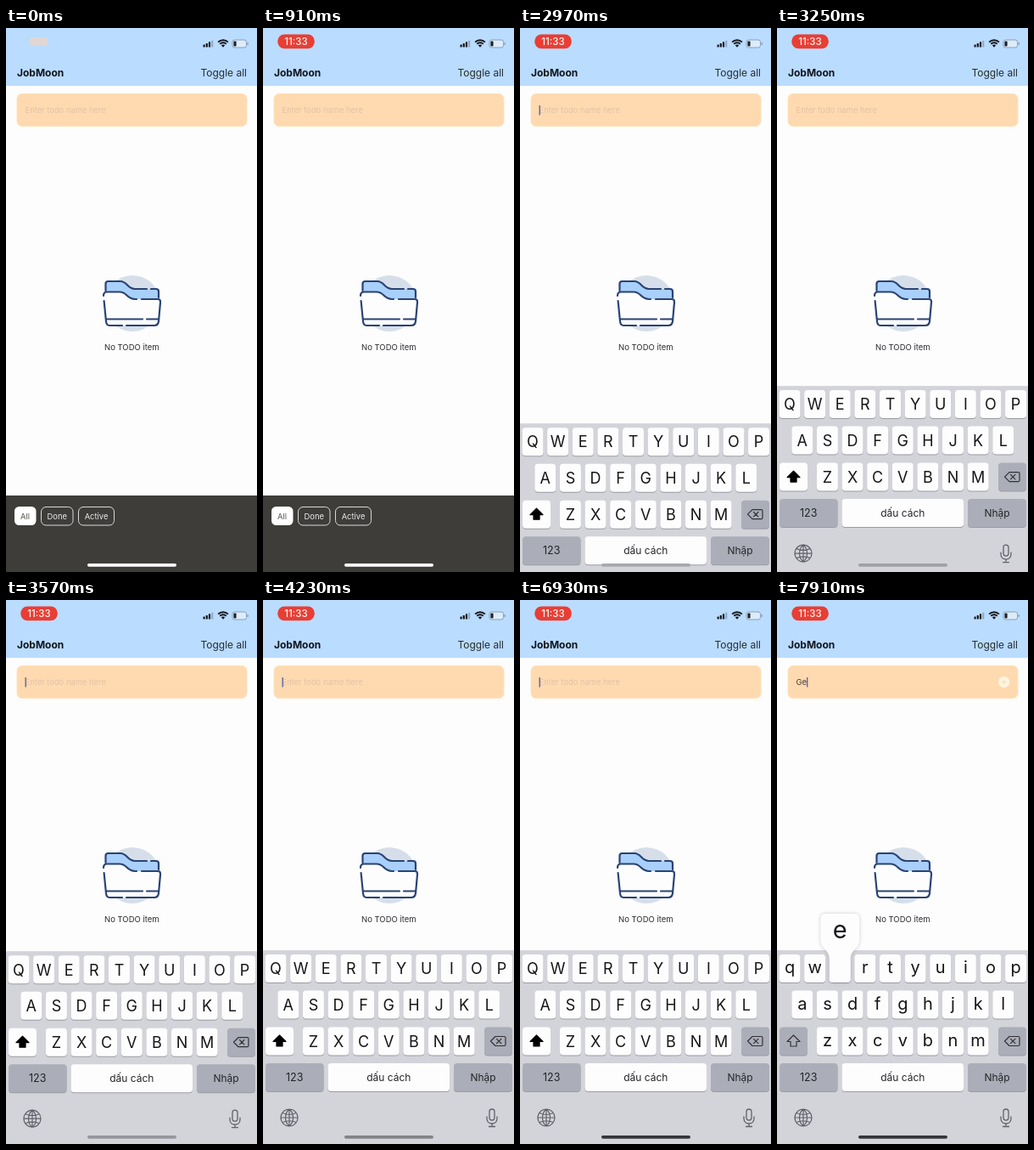
Write an HTML page with a canvas that moves like this. It is 296 px wide and 640 px high and loops after 8000 ms.

```html
<!DOCTYPE html>
<html lang="en">
<head>
<meta charset="utf-8">
<title>Task list</title>
<style>
html, body { margin: 0; width: 100%; height: 100%; overflow: hidden; background: #fdfdfe; }
canvas { display: block; width: 296px; height: 640px; }
</style>
</head>
<body>
<canvas id="stage"></canvas>
<script>
const W = 296, H = 640, LOOP = 8000;
const FOCUS = 2740, KB_TOP = 412;
const KEY_W = 25, KEY_H = 33, PITCH = 29.62;
const INK = '#161619', LINE = '#2a4374', FONT = 'Inter, "Open Sans", sans-serif';
const ROWS = ['QWERTYUIOP', 'ASDFGHJKL', 'ZXCVBNM'];
const ROW_X = [15, 29.8, 59.4];
const ROW_Y = [5, 47.5, 90.5, 133];
const PRESSES = [
  { char: 'G', from: 7300, to: 7430 },
  { char: 'e', from: 7780, to: 8000 }
];

const canvas = document.getElementById('stage');
const ratio = window.devicePixelRatio || 1;
canvas.width = W * ratio;
canvas.height = H * ratio;
const c = canvas.getContext('2d');

const clamp = v => Math.max(0, Math.min(1, v));
const ramp = (t, from, to) => clamp((t - from) / (to - from));
const mix = (a, b, k) => `rgb(${a.map((v, i) => Math.round(v + (b[i] - v) * k))})`;

function rect(x, y, w, h, color) {
  c.fillStyle = color;
  c.fillRect(x, y, w, h);
}

function box(x, y, w, h, r, fill, stroke, width = 1) {
  c.beginPath();
  c.roundRect(x, y, w, h, r);
  if (fill) { c.fillStyle = fill; c.fill(); }
  if (stroke) { c.strokeStyle = stroke; c.lineWidth = width; c.stroke(); }
}

function disc(x, y, r, color) {
  c.beginPath();
  c.arc(x, y, r, 0, Math.PI * 2);
  c.fillStyle = color;
  c.fill();
}

function text(str, x, y, size, color, align = 'left', weight = 400) {
  c.font = `${weight} ${size}px ${FONT}`;
  c.textAlign = align;
  c.fillStyle = color;
  c.fillText(str, x, y);
}

function path(d, stroke, width, fill) {
  const p = new Path2D(d);
  if (fill) { c.fillStyle = fill; c.fill(p); }
  if (stroke) { c.strokeStyle = stroke; c.lineWidth = width; c.stroke(p); }
}

function drawStatus(t) {
  const shown = ramp(t, 60, 450);
  if (shown < 1) {
    c.globalAlpha = 1 - shown;
    box(28, 11, 21, 10, 3, '#e0d6d4');
  }
  c.globalAlpha = shown;
  const glow = Math.exp(-(((t - 5390) / 550) ** 2));
  box(17.3, 7.5, 43.5, 16.8, 8, mix([232, 62, 52], [252, 72, 68], glow));
  text('11:33', 39, 20.1, 11.5, '#fff3f0', 'center', 500);
  c.globalAlpha = 1;

  for (let i = 0; i < 4; i++) {
    const h = 3 + i * 1.6;
    box(232.5 + i * 3.2, 22.5 - h, 2.2, h, 0.6, i < 3 ? INK : '#93aac6');
  }
  c.lineCap = 'butt';
  for (const r of [8.3, 5.3]) {
    c.beginPath();
    c.arc(256, 22.5, r, -Math.PI * 0.75, -Math.PI * 0.25);
    c.strokeStyle = INK;
    c.lineWidth = 1.9;
    c.stroke();
  }
  path('M256 22.8 L253.8 20.3 Q256 18.7 258.2 20.3 Z', null, 0, INK);
  box(267, 14, 16.5, 9, 2.5, '#dcecfc', '#8298b0', 0.9);
  box(268.4, 15.4, 3.2, 6.2, 1, '#1d2229');
  rect(284.5, 17, 1.2, 3, '#8298b0');
}

function cursorOn(t, typed) {
  const phase = (t - FOCUS) % 1000;
  return t >= FOCUS && (typed || phase < 500 || phase > 800);
}

function drawInput(t) {
  const typed = PRESSES.filter(p => t >= p.from + 60).map(p => p.char).join('');
  box(13, 77.5, 271, 38, 6, '#ffdab0', '#ffe0b4');
  if (typed) {
    text(typed, 22.5, 100, 9.4, '#453a30');
    disc(267.7, 96.4, 6.5, '#fff6e2');
    path('M264.7 96.4h6M267.7 93.4v6', '#ffdcb0', 1.2);
  } else {
    text('Enter todo name here', 22.5, 100, 9.4, '#e3c2a4');
  }
  if (cursorOn(t, typed)) {
    c.font = `400 9.4px ${FONT}`;
    rect(22.5 + c.measureText(typed).width, 91, 1.4, 11.5, '#5a66a8');
  }
}

function drawFolder() {
  disc(149, 324, 33, '#d6dfe9');
  c.lineCap = c.lineJoin = 'round';
  path('M117.5 316 V301 Q117.5 298 120.5 298 H135 C143 298 143 307 152 307 H177 Q180 307 180 310 V320 H150 Z', null, 0, '#a9cffb');
  path('M117.5 309 V301 Q117.5 298 120.5 298 H135 C143 298 143 307 152 307 H166 M171 307 H177 Q180 307 180 310 V317', LINE, 2.2);
  path('M115 315 Q115 310.5 119 310.5 H134 C143 310.5 142 319 152 319 H179 Q182.5 319 182 323 L180 345 Q179.3 350 175 350 H122 Q118.5 350 118 345 Z', null, 0, '#fdfdfe');
  path('M115 315 Q115 310.5 119 310.5 H134 C143 310.5 142 319 152 319 H154 M160 319 H179 Q182.5 319 182 323 L180 345 Q179.3 350 175 350 H142 M137 350 H122 Q118.5 350 118 345 L115.6 321 M119 342.5 H161 M166 342.5 H179', LINE, 2.2);
  text('No TODO item', 148.3, 379.4, 9.5, '#2c2c30', 'center');
}

function drawFooter() {
  rect(0, 550, W, 90, '#3f3d3a');
  box(10, 563, 25.5, 22, 5.5, '#ffffff');
  text('All', 22.5, 577.5, 9.4, '#55534f', 'center');
  for (const [label, x, w] of [['Done', 41.5, 37.5], ['Active', 85.5, 42]]) {
    box(x, 563.5, w, 21.5, 5.5, null, '#dad8d8');
    text(label, x + w / 2, 577.5, 9.4, '#eceaea', 'center');
  }
}

function key(x, y, w, fill) {
  box(x, y + 1, w, KEY_H, 4, '#9a9ca3');
  box(x, y, w, KEY_H, 4, fill);
}

function letter(char, x, y) {
  const small = char !== char.toUpperCase();
  text(char, x, y + (small ? 22 : 23.3), small ? 20 : 18, INK, 'center');
}

function popup(char) {
  const row = ROWS.findIndex(r => r.includes(char.toUpperCase()));
  const x = ROW_X[row] + ROWS[row].indexOf(char.toUpperCase()) * PITCH;
  const y = KB_TOP + ROW_Y[row];
  c.save();
  c.translate(x, y);
  c.shadowColor = 'rgba(110,112,125,.35)';
  c.shadowBlur = 4 * ratio;
  path('M-17 -48 H17 Q23 -48 23 -42 V-18 C23 -6 12.5 -6 12.5 5 V29 Q12.5 33 8.5 33 H-8.5 Q-12.5 33 -12.5 29 V5 C-12.5 -6 -23 -6 -23 -18 V-42 Q-23 -48 -17 -48 Z', null, 0, '#fdfdfe');
  c.restore();
  text(char, x, y - 19, 29, INK, 'center');
}

function drawKeyboard(t) {
  if (t < FOCUS) return;
  const offset = (H - KB_TOP) * Math.exp(-6.3 * (t - FOCUS) / 1000);
  const lower = t >= PRESSES[0].to;
  const gray = '#abaeb8', white = '#fdfdfe';

  c.save();
  c.translate(0, KB_TOP + offset);
  rect(0, 0, W, H - KB_TOP, '#d3d4da');
  ROWS.forEach((row, r) => [...row].forEach((char, i) => {
    const x = ROW_X[r] + i * PITCH;
    key(x - KEY_W / 2, ROW_Y[r], KEY_W, white);
    letter(lower ? char.toLowerCase() : char, x, ROW_Y[r]);
  }));

  c.lineJoin = c.lineCap = 'round';
  key(3, ROW_Y[2], 33, lower ? gray : white);
  path('M19.5 100 L27 107.5 H23 V113 H16 V107.5 H12 Z', lower ? '#34353a' : '#000', 1.2, lower ? null : '#000');
  key(261, ROW_Y[2], 33, gray);
  path('M274 101.5 H284.5 Q286 101.5 286 103 V111 Q286 112.5 284.5 112.5 H274 L268.5 107 Z M275.5 104.3 l5.4 5.4 m0 -5.4 l-5.4 5.4', '#313237', 1.2);

  for (const [label, x, w, fill] of [['123', 3, 68.5, gray], ['dấu cách', 76.5, 143.5, white], ['Nhập', 225, 69, gray]]) {
    key(x, ROW_Y[3], w, fill);
    text(label, x + w / 2, ROW_Y[3] + 21, label === '123' ? 12.5 : 12, '#242529', 'center');
  }

  c.save();
  c.translate(31, 197);
  const tone = '#60626a';
  path('M10 0A10 10 0 1 1 -10 0A10 10 0 1 1 10 0 M0 -10V10 M-10 0H10 M0 -10C-6 -5 -6 5 0 10C6 5 6 -5 0 -10 M-8 -5.5Q0 -2 8 -5.5 M-8 5.5Q0 2 8 5.5', tone, 1.2);
  c.translate(239, 0);
  box(-3, -10, 6, 13, 3, null, tone, 1.3);
  path('M-6 -1V1C-6 9 6 9 6 1V-1M0 7V10.5M-3.5 10.5H3.5', tone, 1.3);
  c.restore();
  c.restore();

  const pressed = PRESSES.find(p => t >= p.from && t < p.to);
  if (pressed) popup(pressed.char);
}

function homeBarColor(t) {
  const gray = [168, 169, 174];
  if (t < 2970) return mix([255, 255, 255], gray, ramp(t, FOCUS, 2970));
  return mix(gray, [52, 53, 56], ramp(t, 2970, 6900));
}

function draw(t) {
  c.setTransform(ratio, 0, 0, ratio, 0, 0);
  rect(0, 0, W, H, '#fdfdfe');
  rect(0, 0, W, 68, '#badcff');
  drawStatus(t);
  text('JobMoon', 13, 56.5, 12, '#10151c', 'left', 700);
  text('Toggle all', 284, 56.5, 12, '#252c33', 'right');
  drawInput(t);
  drawFolder();
  drawFooter();
  drawKeyboard(t);
  box(96, 630, 105, 3.7, 1.9, homeBarColor(t));
}

const start = performance.now();
function frame() {
  draw((performance.now() - start) % LOOP);
  requestAnimationFrame(frame);
}
frame();
</script>
</body>
</html>
```
